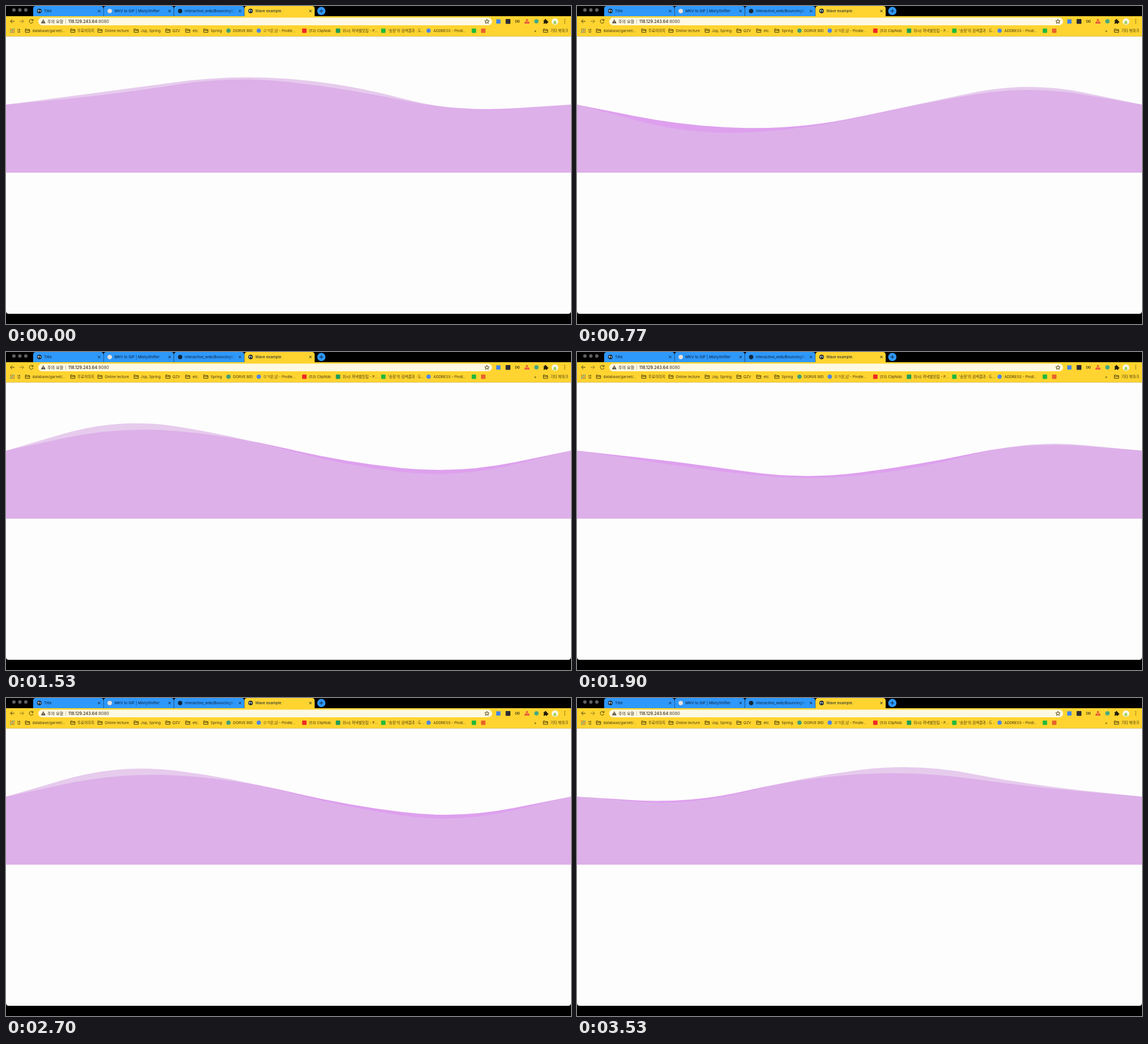
Write an HTML page that moves like this. It is 998 px wide and 561 px high and loops after 3.59 s.

```html
<!DOCTYPE html>
<html lang="ko">
<head>
<meta charset="utf-8">
<title>Wave example.</title>
<style>
html, body { margin: 0; width: 100%; height: 100%; overflow: hidden; background: #000; }
svg { display: block; }
text { font-family: Inter, "Noto Sans CJK KR", "Noto Sans CJK", sans-serif; fill: #2b2410; }
.tab { font-size: 6.7px; fill: #0c2038; }
.mark { font-size: 6.5px; fill: #41370f; }
.line { fill: none; stroke: #4a3d0c; stroke-width: 1; }
</style>
</head>
<body>
<svg width="998" height="561" viewBox="0 0 998 561">
  <defs>
    <linearGradient id="fade">
      <stop offset="0" stop-color="#2e98fb" stop-opacity="0"/>
      <stop offset="1" stop-color="#2e98fb"/>
    </linearGradient>
    <g id="globe">
      <circle r="4" fill="#14202c"/>
      <path d="M-2.8-1.2L-.4-2.6 0-.8-1.4.6-.6 2.6-2 1.6Z M1-2L2.8-.6 2 1.6.8.6Z" fill="#cfdbe4"/>
    </g>
    <path id="close" class="line" d="M-2-2L2 2M2-2L-2 2" style="stroke:#10202e"/>
    <path id="folder" class="line" d="M-3.8-2.8H-.8L.2-1.7H3.8V3H-3.8ZM-3.8-.4H3.8"/>
  </defs>

  <path d="M0 18H998V538Q998 543 993 543H5Q0 543 0 538Z" fill="#fdfdfd"/>
  <path id="back" fill="#dea0ee"/>
  <path id="front" fill="#ddb7e8" fill-opacity=".71"/>

  <g id="tabs">
    <g fill="#5f5f61">
      <circle cx="14" cy="7" r="3.1"/><circle cx="24.5" cy="7" r="3.1"/><circle cx="35" cy="7" r="3.1"/>
    </g>
  </g>

  <rect y="18" width="998" height="35.5" fill="#ffd430"/>
  <rect y="53" width="998" height="1" fill="#d9c063"/>

  <g class="line">
    <path d="M15 27H8M11 23.7L7.7 27 11 30.3"/>
    <path d="M24 27H31M28 23.7L31.3 27 28 30.3" stroke="#8d7520"/>
    <path d="M47.4 25.2A3.4 3.4 0 1 0 47.8 28M47.8 23V25.8H45"/>
  </g>
  <rect x="57" y="20.5" width="801.5" height="13.6" rx="6.8" fill="#fff9e3"/>
  <path d="M65.8 23.2L69.8 30.4H61.8Z" fill="#4b4638"/>
  <path d="M65.8 25.6V28M65.8 28.7V29.6" stroke="#fff9e3" stroke-width=".9"/>
  <text x="73" y="29.6" font-size="7.2">주의 요함</text>
  <path d="M105.5 23V31.5" stroke="#b9b19a" stroke-width=".8"/>
  <text x="110" y="29.7" font-size="7.3" font-weight="500">118.129.243.64<tspan fill="#5d5643">:8080</tspan></text>
  <path class="line" stroke-width=".9" d="M849.5 23.3L850.6 26 853.4 26.2 851.2 28 852 30.8 849.5 29.2 847 30.8 847.8 28 845.6 26.2 848.4 26Z"/>

  <rect x="866" y="23.5" width="7.5" height="7.5" fill="#4285e8"/>
  <rect x="882.5" y="23" width="8.5" height="8.5" rx="1" fill="#2c2c30"/>
  <text x="899" y="29.4" font-size="6.5" font-weight="600">(x)</text>
  <path d="M918.6 23.2H921.6V25.8H918.6ZM916 28.2H918.6V31H916ZM919 28.2H921.4V31H919ZM921.8 28.2H924.4V31H921.8Z" fill="#e3453f"/>
  <path d="M920.1 25V28.5M917.3 28.5V27H923.1V28.5" fill="none" stroke="#e3453f" stroke-width=".7"/>
  <circle cx="937" cy="27" r="3.8" fill="#43a984"/>
  <path d="M949.6 25H951.6A1.4 1.4 0 1 1 954.2 25H956V27A1.3 1.3 0 1 1 956 29.3V31.2H953.7A1.2 1.2 0 0 0 951.4 31.2H949.6V29.2A1.2 1.2 0 0 0 949.6 27Z" fill="#221c08"/>
  <circle cx="969.7" cy="27.5" r="5.8" fill="#f6f8ea"/>
  <path d="M967 32V28A2.6 2.6 0 0 1 972 28V32Z" fill="#a8d36a"/>
  <g fill="#4a3d0c">
    <circle cx="987" cy="24" r=".8"/><circle cx="987" cy="27" r=".8"/><circle cx="987" cy="30" r=".8"/>
  </g>

  <g id="marks"></g>
</svg>
<script>
const NS = 'http://www.w3.org/2000/svg';
const $ = id => document.getElementById(id);

function add(parent, tag, attrs, text) {
  const el = document.createElementNS(NS, tag);
  for (const k in attrs) el.setAttribute(k, attrs[k]);
  if (text) el.textContent = text;
  parent.appendChild(el);
  return el;
}

// Tab strip: title and favicon colour (none means the globe)
const tabs = $('tabs');
[['Title'], ['MKV to GIF | MistyShifter', '#e9dfd8'],
 ['interactive_web/BouncingBall', '#14283c'], ['Wave example.']].forEach(([title, dot], i) => {
  const x = 48 + i * 124.4, active = i === 3;
  add(tabs, 'path', {
    d: `M${x} 18V5Q${x} 0 ${x + 5} 0H${x + 119}Q${x + 124} 0 ${x + 124} 5V18Z`,
    fill: active ? '#ffd430' : '#2e98fb'
  });
  if (dot) add(tabs, 'circle', { cx: x + 10.8, cy: 8.8, r: 3.9, fill: dot });
  else add(tabs, 'use', { href: '#globe', x: x + 10.8, y: 8.8 });
  add(tabs, 'text', { x: x + 19, y: 11.2, class: 'tab' }, title);
  if (i === 2) {
    add(tabs, 'rect', { x: x + 95, y: 2, width: 12, height: 14, fill: 'url(#fade)' });
    add(tabs, 'rect', { x: x + 107, y: 2, width: 15, height: 14, fill: '#2e98fb' });
  }
  add(tabs, 'use', { href: '#close', x: x + 116.5, y: 8.8 });
});
add(tabs, 'circle', { cx: 557, cy: 8.8, r: 7.3, fill: '#2e98fb' });
add(tabs, 'path', { d: 'M553.8 8.8H560.2M557 5.6V12', stroke: '#0b1d30', 'stroke-width': 1 });

// Bookmarks: icon x, icon kind, colour, text x, label
const marks = $('marks');
for (let i = 0; i < 9; i++) {
  add(marks, 'rect', {
    x: 7.5 + (i % 3) * 2.8, y: 40 + Math.floor(i / 3) * 2.8, width: 1.7, height: 1.7,
    fill: ['#d9483b', '#3f8f4f', '#3d78c9'][(i + Math.floor(i / 3)) % 3]
  });
}
[
  [0, '', '', 19.5, '앱'],
  [38, 'folder', '', 46.5, 'database/garnet/...'],
  [118, 'folder', '', 126, '무료이미지'],
  [166, 'folder', '', 174.5, 'Online lecture.'],
  [230, 'folder', '', 238, 'Jsp, Spring.'],
  [286, 'folder', '', 294, 'QZV'],
  [321, 'folder', '', 329.5, 'etc.'],
  [353, 'folder', '', 361.5, 'Spring'],
  [393, 'dot', '#3f9f7a', 401, 'DORVE BID'],
  [446.5, 'dot', '#4d86e8', 454.5, 'ㅁㄲ몬,넝 - Pindle...'],
  [527, 'box', '#ee2a24', 535, '(53) ClipNob'],
  [586.5, 'box', '#1f9d58', 594.5, '위시) 저녁별맛집 - P...'],
  [666.5, 'box', '#20b83c', 674.5, "'송장'의 검색결과 : 도..."],
  [746.5, 'dot', '#4d86e8', 755, 'ADDRESS - Pindl...'],
  [826.5, 'box', '#20b83c'],
  [843, 'box', '#e8632c'],
  [0, '', '', 933, '»'],
  [953, 'folder', '', 961.5, '기타 북마크']
].forEach(([x, kind, fill, tx, label]) => {
  if (kind === 'folder') add(marks, 'use', { href: '#folder', x, y: 43.4 });
  if (kind === 'dot') add(marks, 'circle', { cx: x, cy: 43.5, r: 3.8, fill });
  if (kind === 'box') add(marks, 'rect', { x: x - 3.9, y: 39.8, width: 7.8, height: 7.6, rx: 1, fill });
  if (label) add(marks, 'text', { x: tx, y: 45.9, class: 'mark' }, label);
});

// Waves: sine-driven points joined by quadratics through their midpoints
const LOOP = 3590, STEP = 100 / 3, LAST = 106;
const WIDTH = 998, MID = 174, FLOOR = 294;
const waves = [
  [$('back'), [43, 51.5, 46, 41]],
  [$('front'), [58.5, 53.5, 60, 49]]
];
// Time in ms, phase in radians
const phases = [[0, 2.6], [770, 6.45], [1530, 10.01], [2270, 14.21], [2700, 16.17], [3130, 18.5], [3534, 20.7]];

function phaseAt(t) {
  let i = 1;
  while (i < phases.length - 1 && t > phases[i][0]) i++;
  const [t0, p0] = phases[i - 1], [t1, p1] = phases[i];
  return p0 + (p1 - p0) * (t - t0) / (t1 - t0);
}

function wavePath(amps, phase) {
  const gap = WIDTH / (amps.length + 1);
  const ys = [MID, ...amps.map((a, i) => MID + a * Math.sin(phase + i + 1)), MID];
  let d = `M0 ${MID}`;
  for (let i = 1; i < ys.length; i++) {
    const px = gap * (i - 1), py = ys[i - 1];
    d += `Q${px} ${py} ${px + gap / 2} ${(py + ys[i]) / 2}`;
  }
  return d + `L${WIDTH} ${MID}V${FLOOR}H0Z`;
}

let start = null;
function draw(now) {
  if (start === null) start = now;
  const t = (now - start) % LOOP;
  const step = Math.min(LAST, Math.floor((t + 3.4) / STEP));
  const phase = phaseAt(step * STEP);
  for (const [el, amps] of waves) el.setAttribute('d', wavePath(amps, phase));
  requestAnimationFrame(draw);
}
draw(performance.now());
</script>
</body>
</html>
```
